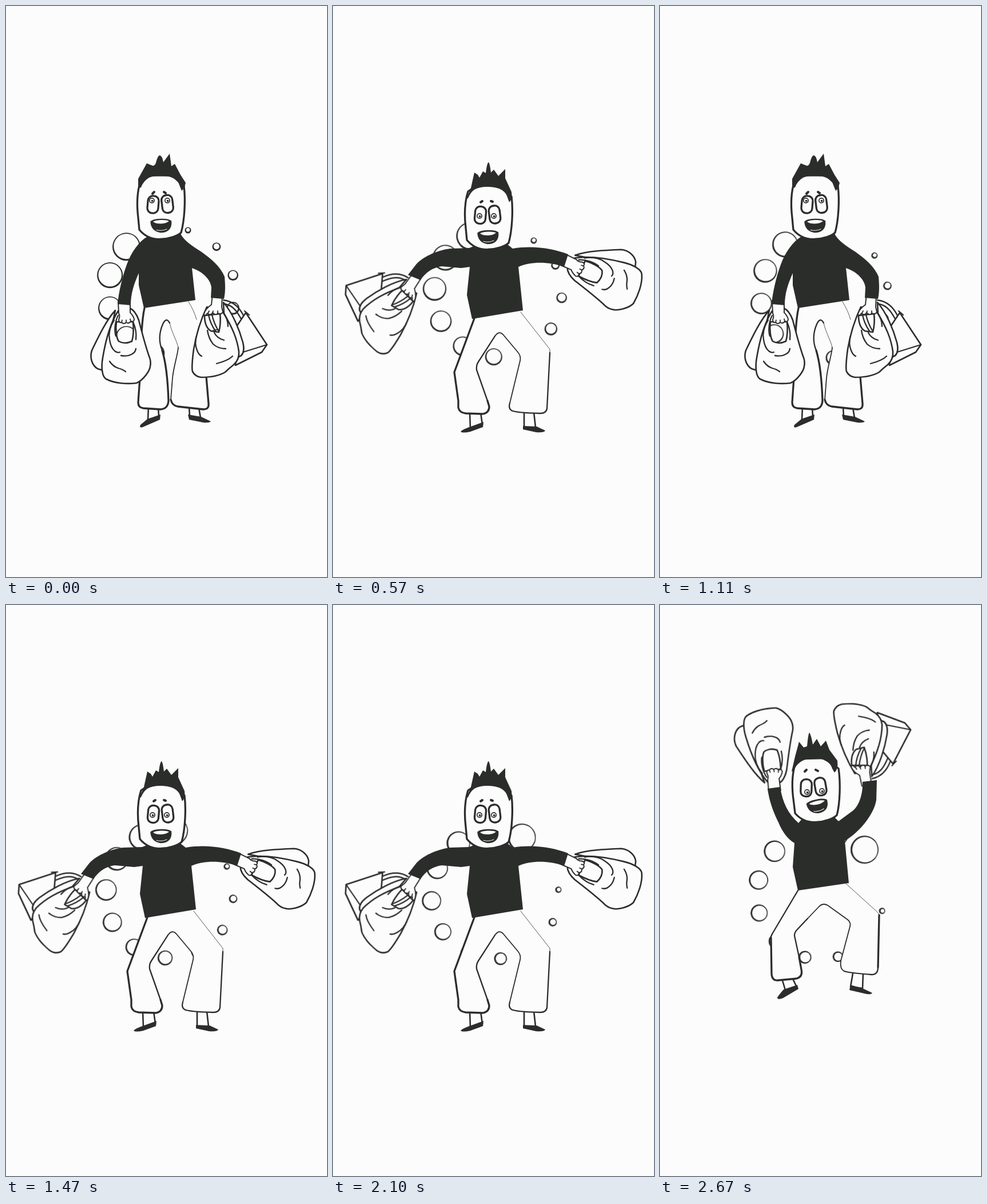
An HTML page for the animation above (2700 ms loop, 561x998 px).

```html
<!DOCTYPE html>
<html lang="en">
<head>
<meta charset="utf-8">
<title>Shopping dance</title>
<style>
  html, body { margin: 0; width: 100%; height: 100%; overflow: hidden; background: #fcfcfc; }
  svg { display: block; width: 561px; height: 998px; }
  path, use { stroke-linecap: round; stroke-linejoin: round; }
  .w { fill: #fcfcfc; }
  .k { fill: #2b2d2b; }
  .o { fill: #fcfcfc; stroke: #2b2d2b; stroke-width: 2.6; }
  .l { fill: none; stroke: #2b2d2b; stroke-width: 2.3; }
  .thick { stroke-width: 3.3; }
  .mid { stroke-width: 1.8; }
  .thin { stroke-width: .8; }
  .brow { stroke-width: 4; }
  #ring { transform-origin: 280.5px 499px; animation: turn 2.7s steps(90) infinite; }
  .pose { visibility: hidden; animation: 900ms step-end infinite; }
  #stand { animation-name: first; }
  #swing { animation-name: second; }
  #jump { animation-name: third; }
  @keyframes turn { to { transform: rotate(90deg); } }
  @keyframes first { 0% { visibility: visible; } 33.333%, 100% { visibility: hidden; } }
  @keyframes second { 0% { visibility: hidden; } 33.333% { visibility: visible; } 66.666%, 100% { visibility: hidden; } }
  @keyframes third { 0% { visibility: hidden; } 66.666%, 100% { visibility: visible; } }
</style>
</head>
<body>
<svg viewBox="0 0 561 998">
  <defs>
    <g id="bags">
      <path class="o" d="M191 532C176 548 162 577 150 602C146 614 150 628 160 634L170 637L185 560Z"/>
      <path class="o" fill-rule="evenodd" d="M196 533C183 553 174 585 169 615C166 632 168 648 175 652C190 660 212 661 228 659C240 654 251 638 252 630Q254 621 250 612C243 592 238 572 232 549Q226 532 216 528Z
        M193 552C191 566 193 580 197 586Q207 592 220 586Q224 573 222 552Z"/>
      <path class="l" d="M189 549C182 560 179 572 181 583Q183 597 190 603Q195 607 199 605M181 621Q187 630 196 633Q204 635 209 639M201 611Q212 613 219 609Q226 606 227 599M222 552Q229 568 227 583M196 541C190 552 189 568 192 577"/>
      <path class="o" style="stroke-width:2" d="M196 515L197 537Q200 542 197 548Q197 554 202 553Q206 557 210 553Q215 556 218 551Q224 553 224 547Q221 539 217 536L217 515"/>
      <path class="l mid" d="M202 553L203 549M210 553L210 549M218 551L217 547"/>
    </g>
    <g id="paper">
      <path class="l" d="M380 514C398 516 409 529 415 541M383 521C397 523 405 536 411 547"/>
      <path class="o" d="M403 560L419 536L456 592L447 605L401 628Z"/>
      <path class="l" d="M456 592L411 606M417 533L425 540"/>
      <path class="o" d="M380 518C396 536 408 566 414 588Q418 604 411 611L403 615L382 560Z"/>
      <path class="o" fill-rule="evenodd" d="M351 526C342 545 333 570 328 600C326 615 324 632 326 639Q331 648 341 649Q368 649 383 640Q390 633 398 627Q408 618 407 604C404 582 396 562 378 533Z
        M347 541C347 553 350 563 358 568L372 570Q376 554 374 538Z"/>
      <path class="l" d="M333 577Q329 590 334 602Q337 610 342 612M352 567Q354 581 362 591Q371 599 384 599M364 571Q369 581 381 584M368 625Q388 620 396 612M354 540Q357 555 366 568M360 540Q364 556 371 567M378 533Q388 546 388 560"/>
      <path class="o" style="stroke-width:2" d="M361 503L359 522Q348 530 346 538Q347 544 352 537Q357 542 361 536Q367 542 370 537Q376 540 379 535L377 526L378 503"/>
      <path class="l mid" d="M353 537L355 533M361 537L362 533M370 537L370 533"/>
    </g>
    <path id="face" class="o thick" d="M235 306C229 325 228 345 231 370L233 391C242 402 255 408 270 407.500C285 407 300 402 306 396C312 375 314 340 311 315L290 296H250Z"/>
    <g id="eyes" class="o thick">
      <rect x="247.500" y="332" width="19" height="30" rx="8.500" transform="rotate(5 257 347)"/>
      <rect x="272.500" y="330.500" width="19" height="31" rx="8.500" transform="rotate(-7 282 346)"/>
    </g>
    <g id="pupil">
      <circle class="k" r="5"/><circle class="w" r="3.300"/><circle class="k" r="1.900" cx=".6" cy=".6"/>
    </g>
    <g id="mouth">
      <path class="k" stroke="#2b2d2b" stroke-width="1.500" d="M253 377Q256 373 270 372.500Q285 372 288.500 376Q290 395 270 395.500Q254 393 253 377Z"/>
      <path class="l" style="stroke:#fcfcfc;stroke-width:1" d="M263 391.500Q272 394 281 390"/>
    </g>
    <path id="teeth" class="w" d="M257 377.500Q260 375 270 374.500Q281 374 285 376.500Q280 380.500 271 381Q261 381 257 377.500Z"/>
  </defs>

  <rect class="w" width="561" height="998"/>
  <g id="ring"></g>

  <g id="stand" class="pose">
    <path class="o" d="M249 700L248 723L267 717L266 700M320 700L321 718L340 720L337 702"/>
    <path class="k" d="M247 722L270 714L269 723L239 736Q232 738 235 732ZM318 714L341 718L358 726Q355 729 345 728L320 723Z"/>
    <path class="w" d="M242 526C236 555 235 600 231 693Q231 702 240 704L272 706Q283 704 284 690C283 660 280 625 273 602C266 585 268 570 274 556Q280 543 286 556C290 572 298 583 301 597C300 610 293 630 291 650L288 690Q290 698 300 700L345 705Q355 705 354 695L350 640L333 547L319 514Z"/>
    <path class="l thick" d="M242 528C236 555 236 600 234 650L231 693Q231 702 240 703L270 705Q283 704 284 690C283 660 280 625 273 602M288 688Q290 698 300 700L345 705Q355 705 354 695L350 648"/>
    <path class="l" d="M273 602C266 585 268 570 274 556Q280 543 286 554"/>
    <path class="l mid" d="M301 597C300 610 293 630 291 650L288 688"/>
    <path class="l thin" d="M286 554C290 572 298 583 301 597M319 517Q329 533 333 548"/>
    <use href="#bags"/>
    <use href="#paper"/>
    <path class="k" d="M247 403C232 412 219 430 211 452C203 474 197 500 195 521L218 523C218 502 224 485 232 467V488L241 528L331 514L325 458C346 465 358 480 359 492L358 510L381 512C384 498 383 485 382 473C375 456 360 443 342 430C325 419 312 411 305 398L270 402Z"/>
    <use href="#face"/>
    <path class="k" d="M231 319L231 302L246 275L256 279Q260 280 262 274Q265 261 269 261Q273 262 275 273L286 258L289 280L295 276L305 295L314 309Q312 319 307 323L303 313Q300 302 284 298Q264 294 250 300Q240 306 236 317Z"/>
    <path class="l brow" d="M256 328L259 325M276 325L279 327"/>
    <use href="#eyes"/>
    <use href="#pupil" x="255" y="340"/><use href="#pupil" x="282" y="340"/>
    <use href="#mouth"/>
    <use href="#teeth" y="-.5"/>
  </g>

  <g id="swing" class="pose">
    <path class="o" d="M239 710L240 738L261 732L258 710M334 710V738L354 737L351 710"/>
    <path class="k" d="M241 735L263 727L262 736L240 744Q226 747 223 744Q226 740 241 735ZM332 734L356 735L371 742Q369 746 355 745L332 740Z"/>
    <path class="w" d="M247 544L212 640L218 690Q219 711 232 712L262 713Q273 712 273 700L251 636Q250 628 254 622L283 577Q290 567 297 574L323 605Q329 612 327 620L309 690Q306 702 314 709Q320 712 362 712Q373 712 374 703L380 605L328 533Z"/>
    <path class="l thick" d="M247 546L212 640L219 690V702Q221 711 232 712L262 713Q273 711 273 700L270 690"/>
    <path class="l" d="M270 690L251 636Q250 628 254 622L283 577M309 694Q306 703 312 707Q320 711 362 712Q373 712 374 703L379 606"/>
    <path class="l mid" d="M283 577Q290 567 297 574L323 605Q329 612 327 620L309 694"/>
    <path class="l thin" d="M328 535L379 600V606"/>
    <use href="#paper" transform="translate(97 606) rotate(38.400) scale(-1 1) translate(-325 -638)"/>
    <use href="#bags" transform="translate(525 520) rotate(-66.600) scale(-1 1) translate(-228 -659)"/>
    <path class="k" d="M248 419L238 423L205 424C180 427 155 440 145 452L131 470L153 479C162 465 175 457 190 455L224 458L239 456L234 505L243 547L332 532L324 456C345 447 375 446 404 456L411 434C385 424 350 418 314 424L304 416L270 422Z"/>
    <use href="#face" transform="translate(1 18)"/>
    <path class="k" d="M233 337L241 318L247 291L253 295L256 300L262 289L267 292Q269 274 272 273Q274 275 276 291L281 286L289 297L301 285L301 301L312 325Q314 337 308 343L304 332Q299 320 282 317Q260 314 247 321Q240 326 236 336Z"/>
    <path class="l brow" d="M258 343L261 341M276 341L279 342"/>
    <use href="#eyes" transform="translate(.5 18.500)"/>
    <use href="#pupil" x="256" y="367"/><use href="#pupil" x="281" y="367"/>
    <g transform="translate(0 20)">
      <use href="#mouth"/>
      <use href="#teeth"/>
    </g>
  </g>

  <g id="jump" class="pose">
    <path class="o" d="M213 653L219 673L239 668L231 651M337 644L333 667L354 670L355 644"/>
    <path class="k" d="M216 672L240 664L242 671L215 687Q205 691 205 686Q209 680 216 672ZM333 664L354 670L371 678Q368 682 357 679L331 673Z"/>
    <path class="w" d="M241 497L196 575Q193 580 193 590L195 645Q196 657 206 656L238 653Q250 650 247 637L235 578Q235 572 240 567L278 527Q286 519 296 527L328 550Q334 555 332 562L316 622Q314 636 322 640Q330 643 370 646Q381 646 381 635L383 545Q383 540 378 535L323 485Z"/>
    <path class="l thick" d="M194 582L195 645Q196 657 206 656L238 653Q250 650 247 637L243 615M383 542L381 633"/>
    <path class="l" d="M241 499L196 575Q194 578 194 582M243 615L235 578Q235 572 240 567L258 548M322 640Q330 643 370 646Q381 646 381 633"/>
    <path class="l mid" d="M258 548L278 527Q286 519 296 527L328 550Q334 555 332 562L316 622Q314 636 322 640"/>
    <path class="l thin" d="M325 487L378 535Q383 539 383 542"/>
    <use href="#bags" transform="translate(203 180) rotate(-7.500) scale(1 -1) translate(-228 -659)"/>
    <use href="#paper" transform="translate(303 186) rotate(-6) scale(1 -1) translate(-325 -638)"/>
    <path class="k" d="M188 321C191 345 200 366 207 380C214 397 224 410 235 416L232 458L241 499L330 486L323 412C348 398 374 366 378 341L379 306L354 309C355 335 345 355 335 361L312 378L305 371L270 376L248 374L242 381C224 365 214 345 210 318Z"/>
    <use href="#face" transform="translate(2 -28) rotate(-1.500 270 350)"/>
    <path class="k" d="M230 291L236 265L243 239L251 249L257 247Q259 225 261 223Q264 226 267 244L274 234L281 247L290 237L296 253L310 272Q312 287 305 293L301 286Q298 274 281 269Q262 266 247 273Q237 280 234 290Z"/>
    <path class="l brow" d="M253 291L256 288M272 288L276 290"/>
    <use href="#eyes" transform="translate(-1.500 -28) rotate(-3 270 347)"/>
    <use href="#pupil" x="257" y="327"/><use href="#pupil" x="283" y="325"/>
    <g transform="translate(4.500 -32) rotate(-10 270 384)">
      <use href="#mouth"/>
      <use href="#teeth"/>
    </g>
  </g>
</svg>
<script>
  const ring = document.getElementById('ring');

  function dot(cls, x, y, r) {
    const c = document.createElementNS('http://www.w3.org/2000/svg', 'circle');
    const attrs = { class: cls, cx: x, cy: y, r };
    for (const name in attrs) c.setAttribute(name, attrs[name]);
    ring.append(c);
  }

  // Eleven bubbles on a twelve-slot circle, growing clockwise
  for (let i = 0; i < 11; i++) {
    const a = (30 * i - 75) * Math.PI / 180;
    const x = 289.2 + 111.3 * Math.cos(a);
    const y = 499.5 + 111.3 * Math.sin(a);
    const r = 5.5 + 1.9 * i;
    dot('k', x, y, r);
    dot('w', x, y - 0.7, r - 2.3);
  }
</script>
</body>
</html>
```
